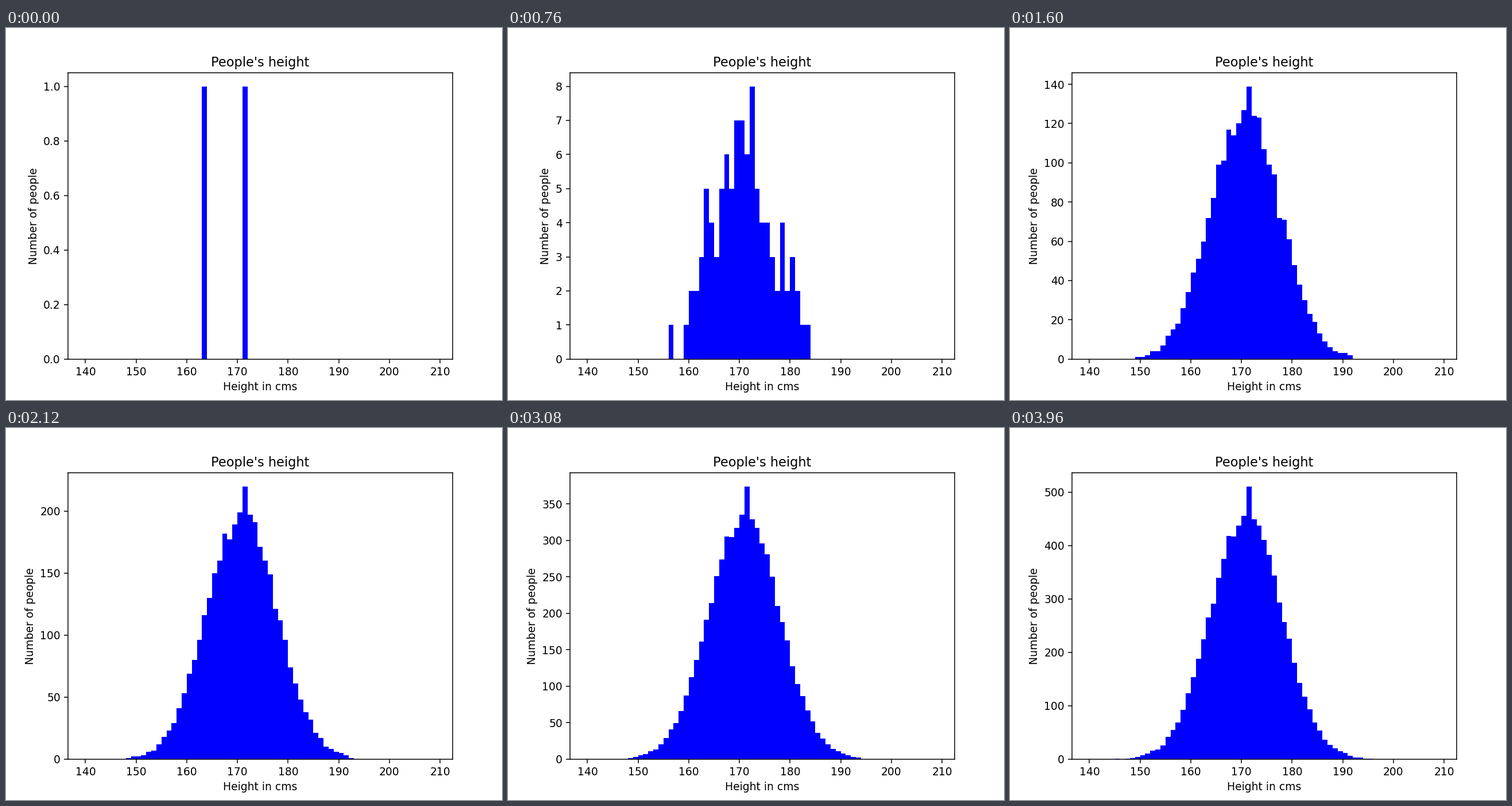
Recreate the animation shown at these times as a matplotlib script. Size 864 by 648 pixels, loop 4 s.

```python
import numpy as np
import matplotlib.pyplot as plt
from matplotlib.animation import FuncAnimation

FRAMES = 100
BINS = np.arange(140, 210)
MEAN, SPREAD = 171, 7
PEAK_BOOST = 1.09      # the middle bin stands above the bell curve
REGULARITY = 8         # higher means steadier arrivals in each bin


def people_at(step):
    """Sample size: grows by 1, then by 10, then by 100 per step."""
    if step < 10:
        return step + 2
    if step < 20:
        return 11 + 10 * (step - 9)
    return 111 + 100 * (step - 19)


rng = np.random.default_rng(7)

# A short opening group, led by two fixed people
opening = [*range(161, 163), *range(164, 168), *range(169, 171),
           *range(172, 176), 167, 171, 172, 172, 172, 180, 181]
opening = np.array([163, 171, *rng.permutation(opening)])

# Afterwards each bin fills at the rate given by the bell curve
z = (BINS[:-1] + 0.5 - MEAN) / SPREAD
rate = np.exp(-z**2 / 2) / (SPREAD * np.sqrt(2 * np.pi))
rate[BINS[:-1] == MEAN] *= PEAK_BOOST
gaps = rng.gamma(REGULARITY, 1 / REGULARITY, (len(rate), 800))
joins = len(opening) + np.cumsum(gaps, axis=1) / rate[:, None]


def counts_at(step):
    n = people_at(step)
    first, _ = np.histogram(opening[:n], bins=BINS)
    return first + (joins <= n).sum(axis=1)


fig, ax = plt.subplots(figsize=(6.4, 4.8), dpi=135)


def draw(step):
    ax.cla()
    ax.hist(BINS[:-1], bins=BINS, weights=counts_at(step), color="blue")
    ax.set_title("People's height")
    ax.set_xlabel("Height in cms")
    ax.set_ylabel("Number of people")


def reset():
    draw(0)


anim = FuncAnimation(fig, draw, frames=FRAMES, init_func=reset,
                     interval=40, repeat=True, repeat_delay=0, blit=False)
plt.show()
```
